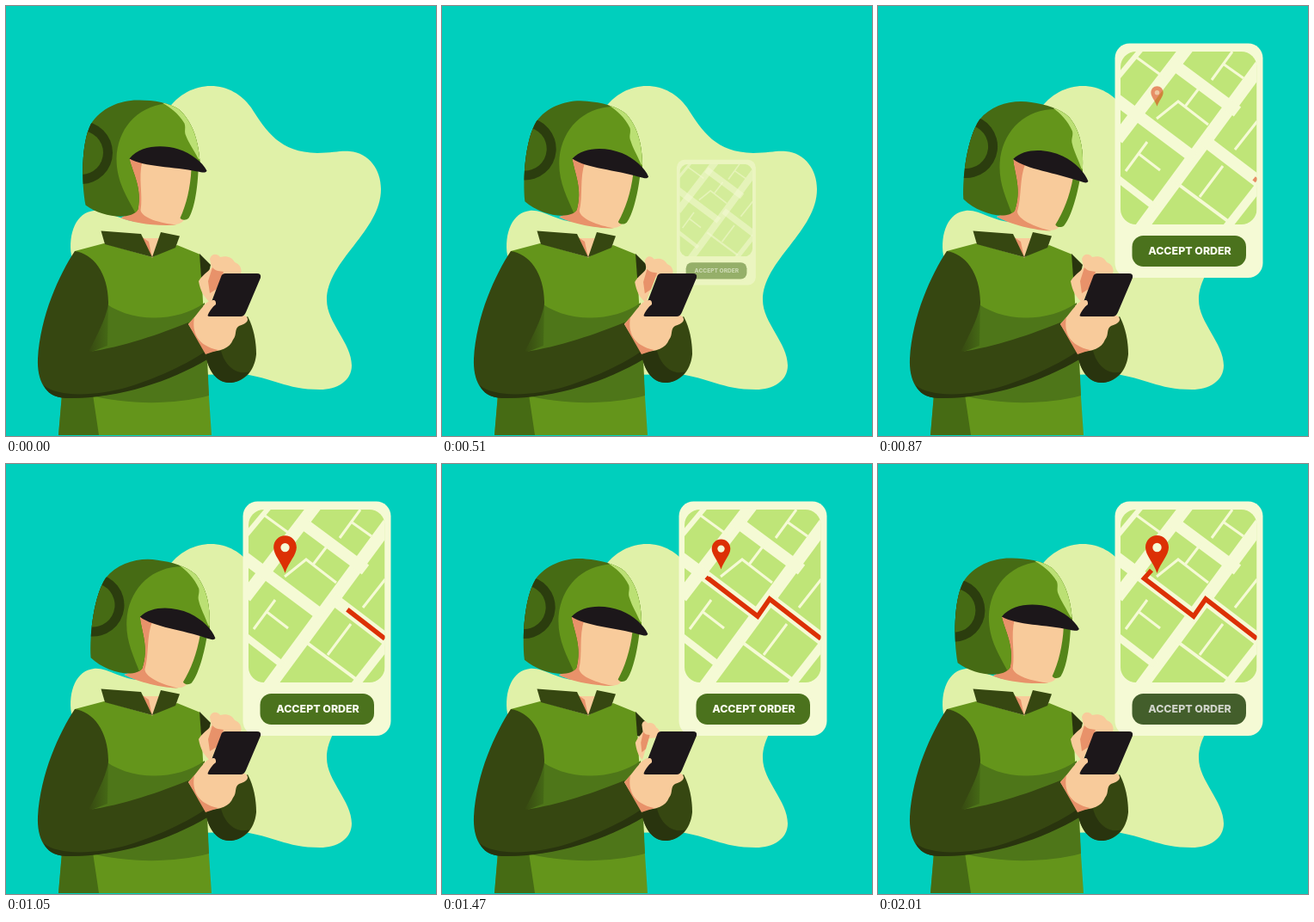
These frames come from a looping animation (500 by 500 pixels, 2.04 s). An HTML page with a canvas:

```html
<!DOCTYPE html>
<html lang="en">
<head>
<meta charset="utf-8">
<title>Accept order</title>
<style>
html, body { margin: 0; width: 100%; height: 100%; overflow: hidden; background: #00cfbd; }
canvas { display: block; width: 500px; height: 500px; }
</style>
</head>
<body>
<canvas id="stage" width="500" height="500"></canvas>
<script>
const ctx = document.getElementById('stage').getContext('2d');
const LOOP = 2040, STEP = 30;

const C = {
  bg: '#00cfbd', blob: '#e0f1a8', card: '#f5fad5', block: '#bfe578',
  light: '#64951b', mid: '#4e7619', helmet: '#466b14', sleeve: '#364711',
  shade: '#29340e', skin: '#f8cb9b', blush: '#e8926a', ink: '#1c171a', red: '#dc3005'
};

const clamp = (v, a = 0, b = 1) => Math.min(b, Math.max(a, v));
const ramp = (t, a, b) => clamp((t - a) / (b - a));

// Piecewise linear value from [time, value] pairs
function track(t, keys) {
  for (let i = 1; i < keys.length; i++) {
    const [t0, v0] = keys[i - 1], [t1, v1] = keys[i];
    if (t <= t1) return v0 + (v1 - v0) * ramp(t, t0, t1);
  }
  return keys[keys.length - 1][1];
}

function fill(d, color) {
  ctx.fillStyle = color;
  ctx.fill(new Path2D(d));
}

function disc(x, y, r, color) {
  ctx.fillStyle = color;
  ctx.beginPath();
  ctx.arc(x, y, r, 0, Math.PI * 2);
  ctx.fill();
}

function box(x, y, w, h, r) {
  ctx.beginPath();
  ctx.roundRect(x, y, w, h, r);
}

function line(d, width, color = C.card) {
  ctx.strokeStyle = color;
  ctx.lineWidth = width;
  ctx.stroke(new Path2D(d));
}

function zoom(x, y, sx, sy = sx) {
  ctx.translate(x, y);
  ctx.scale(sx, sy);
  ctx.translate(-x, -y);
}

function blob() {
  fill(`M187 122C200 102 220 93 238 93C258 93 274 103 285 118C303 146 318 170 362 171
    C380 171 388 168 400 169C422 171 436 190 436 213C436 262 373 296 373 342
    C373 368 402 392 402 418C402 436 385 446 365 446C325 446 310 432 275 428L150 430L76 290
    C72 264 82 240 102 238C120 236 140 256 165 250C190 240 165 150 187 122Z`, C.blob);
}

function map() {
  ctx.fillStyle = C.block;
  ctx.fillRect(282, 53, 158.5, 201);
  // wide streets
  line('M278 155L360 48M304 261L457 53', 15);
  line('M275 107L367 176M378 155L450 210M340 65L418 123', 14);
  line('M402 262L445 207', 10);
  line('M278 200L322 234', 8);
  // narrow streets
  line('M278 84L308 48', 6);
  line('M342 202L408 251', 4);
  line('M324 131L349 111L384 138M357 117L376 92', 3);
  line('M288 192L313 158M302 171L328 191', 3);
  line('M374 222L401 186M415 167L441 134', 3);
  line('M388 86L412 53M401 67L425 84M301 60L334 84', 3);
}

function route(t) {
  const drawn = Math.max(0, (t - 855) * 0.283);
  if (!drawn) return;
  ctx.save();
  ctx.globalAlpha *= ramp(t, 810, 920);
  ctx.setLineDash([drawn, 400]);
  line('M440.5 203L381 157L367 177L309.5 133L318 123.5', 5.5, C.red);
  ctx.restore();
}

function pin(t) {
  const pop = ramp(t, 800, 930);
  if (!pop) return;
  ctx.save();
  ctx.globalAlpha *= pop;
  const pulse = 0.9 + 0.1 * Math.cos((t - 970) / 1040 * Math.PI * 2);
  zoom(324.5, 105, pop * pulse);
  fill('M324.5 83C332 83 338 89 338 97C338 106 329 114 324.5 127C320 114 311 106 311 97C311 89 317 83 324.5 83Z', C.red);
  disc(324.5, 97, 5.2, C.card);
  ctx.restore();
}

function mix(a, b, k) {
  return `rgb(${a.map((v, i) => Math.round(v + (b[i] - v) * k)).join(',')})`;
}

function button(t) {
  const k = ramp(t, 1860, 2010);
  box(295.5, 267, 132.5, 36, 13);
  ctx.fillStyle = mix([75, 114, 29], [67, 94, 43], k);
  ctx.fill();
  ctx.fillStyle = mix([252, 253, 240], [208, 212, 202], k);
  ctx.font = '800 12.4px Inter, "Open Sans", sans-serif';
  ctx.textAlign = 'center';
  ctx.textBaseline = 'alphabetic';
  ctx.fillText('ACCEPT ORDER', 362.5, 289.2);
}

function card(t) {
  const s = track(t, [[408, 0], [618, 1.1], [635, 1.1], [705, 1]]);
  if (s <= 0) return;
  ctx.save();
  ctx.globalAlpha = ramp(t, 408, 600);
  zoom(270, 334, s);
  box(275.5, 43.5, 172, 272.5, 17);
  ctx.fillStyle = C.card;
  ctx.fill();
  ctx.save();
  box(282, 53, 158.5, 201, 18);
  ctx.clip();
  map();
  route(t);
  ctx.restore();
  pin(t);
  button(t);
  ctx.restore();
}

function torso() {
  fill('M80 285L114 276L170 292L199 278L226 289L231 380L239 499H61L66 440Z', C.light);
  fill('M110 341C140 368 196 370 231 345L236 453C195 464 140 464 95 452Z', C.mid);
  fill('M65 452L101 452L108 499H61Z', C.helmet);
  const fold = ctx.createLinearGradient(95, 0, 120, 0);
  fold.addColorStop(0, C.sleeve);
  fold.addColorStop(1, '#466b16');
  fill('M119 342L118 395L92 405Z', fold);
  fill('M225 288L238 301L234 318L227 316Z', C.shade);
  // neck and collar
  fill('M158 270L181 270L170 293Z', C.skin);
  fill('M157 268L166 274L170 293Z', C.blush);
  fill('M110.500 261.500L157 265L170 292L115 277Z', C.sleeve);
  fill('M180 263L202 267.500L197 281L170 292Z', C.sleeve);
}

function arms() {
  fill('M233 396L281 361C288 374 291 390 291 405C289 426 275 438 260 438C244 438 234 422 232 402Z', C.sleeve);
  fill('M232 402L250 401C255 420 270 430 283 425C275 436 265 438 260 438C243 438 233 420 232 402Z', C.shade);
  fill(`M80 285C101 288 119 310 119 345C118 360 105 385 96 402C135 397 180 381 212 368
    L233 405C190 435 130 457 70 456C45 455 36 435 37 410C40 360 62 312 80 285Z`, C.sleeve);
  fill('M44 441C60 455 104 454 142 443C181 431 214 414 231 402L234 411C190 437 130 457 70 456C55 455 48 450 44 441Z', C.shade);
}

function tapHand(t) {
  const k = track(t, [[240, 0], [420, 1], [540, 0], [1130, 0], [1470, 1], [1800, 0]]);
  ctx.save();
  zoom(226, 340, 1 - 0.42 * k, 1 - 0.2 * k);
  fill(`M224 320C228 313 235 309 239 304L237 294C239 288 245 287 249 292C258 290 263 293 266 298
    C272 300 275 306 273 312L251 314L238 345C230 339 226 331 224 320Z`, C.skin);
  fill('M235 320L240 304C244 309 249 308 253 309L245 329L237 334Z', C.blush);
  ctx.restore();
}

function phoneHand() {
  fill(`M212 370C220 362 227 350 234 345C239 340 245 341 244 347L236 360L278 360
    C284 364 281 369 271 372C265 376 269 382 264 388C260 398 250 402 232 402Z`, C.skin);
  fill('M212 370L219 362C216 379 222 395 247 400L232 405Z', C.blush);
  fill('M255 311H292Q297 311 296 316L279 356Q277 361 273 361H237Q233 361 234 357L250 315Q251 311 255 311Z', C.ink);
  fill('M229 349C235 343 245 338 244 347C240 350 236 355 234 361Z', C.skin);
}

function head(t) {
  const k = track(t, [[0, 0], [900, 1], [2040, 0]]);
  ctx.save();
  ctx.translate(147.5, 278.5);
  ctx.rotate(k * 8 * Math.PI / 180);
  ctx.translate(-147, -279);

  fill('M143 178L217 188C216 215 212 236 207 248C204 256 192 256 170 254C154 253 143 250 133 247L150 238Z', C.skin);
  fill(`M142 178L158 181C153 200 159 220 156 238C158 247 178 253 198 255
    C172 257 145 252 133 247L150 238Z`, C.blush);
  fill('M215 190L223 193C222 215 218 238 212 247C209 250 204 250 202 247C209 232 214 212 215 190Z', '#548519');

  const shell = `M92 232C87 205 87 160 98 138C110 118 135 109 155 110C171 110 190 113 201 121
    C214 133 223 152 225 182L143 178C147 195 158 212 153 237C146 250 112 247 92 232Z`;
  fill(shell, C.helmet);
  ctx.save();
  ctx.clip(new Path2D(shell));
  disc(87, 171, 36.5, '#2b3d0e');
  disc(87, 171, 25.5, C.helmet);
  fill('M185 114C151 118 129 144 128 178C128 205 140 222 151 243L164 238L150 185L230 185V115Z', C.light);
  fill('M181 113L230 113V182L223 178C218 168 212 160 209 152C206 146 209 143 207 137C200 125 190 118 181 113Z', '#bbe074');
  ctx.restore();

  fill('M143 178C155 163 180 161 200 167C215 172 228 182 233 192C232 195 228 194 222 193C195 187 160 188 143 178Z', C.ink);
  ctx.restore();
}

function draw(t) {
  ctx.fillStyle = C.bg;
  ctx.fillRect(0, 0, 500, 500);
  blob();
  card(t);
  torso();
  arms();
  tapHand(t);
  phoneHand();
  head(t);
}

const start = performance.now();
function tick() {
  const t = (performance.now() - start) % LOOP;
  draw(Math.floor(t / STEP) * STEP);
  requestAnimationFrame(tick);
}
tick();
</script>
</body>
</html>
```
